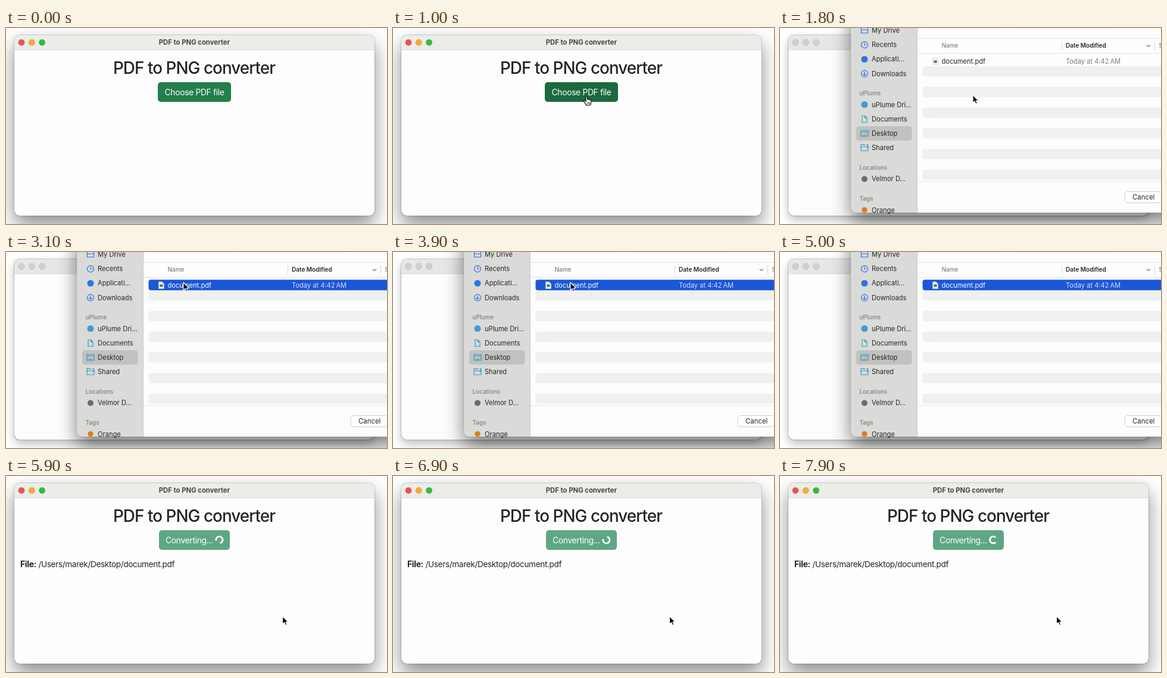
Recreate the animation shown at these times as an HTML page. Size 640 by 329 pixels, loop 8000 ms.

```html
<!DOCTYPE html>
<html lang="en">
<head>
<meta charset="utf-8">
<title>PDF to PNG converter</title>
<style>
  html, body { margin: 0; width: 100%; height: 100%; overflow: hidden; background: #fff; }
  #stage { position: relative; width: 640px; height: 329px; overflow: hidden; background: #fff; }
  svg { position: absolute; left: 0; top: 0; }
  .win { position: absolute; box-sizing: border-box; overflow: hidden; background: #fdfdfd; }
  #app { left: 14px; top: 12px; width: 605px; height: 303px; border-radius: 9px;
    box-shadow: 0 0 0 1px rgba(0,0,0,.1), 0 0 1px rgba(0,0,0,.5), 0 15px 32px rgba(0,0,0,.46); }
  #app.idle { box-shadow: 0 0 0 1px rgba(0,0,0,.13), 0 0 1px rgba(0,0,0,.5), 0 7px 16px rgba(0,0,0,.26); }
  #bar { height: 25px; background: #ecece8; border-bottom: 1px solid #d8d8d5; box-sizing: border-box; }
  .idle #bar { background: #e7e7e5; }
  #panel { left: 119px; top: -120px; width: 700px; height: 430px; border-radius: 9px;
    box-shadow: 0 0 1px rgba(0,0,0,.7), 0 15px 32px rgba(0,0,0,.5); }
  #side { width: 111px; height: 100%; background: #dadad8; border-right: 1px solid #c9c9c7; }
  text { font-family: Inter, Roboto, sans-serif; font-size: 11.1px; fill: #262626; white-space: pre; }
  .h1 { font-size: 27.8px; font-weight: 500; letter-spacing: -.033em; fill: #212529; text-anchor: middle; }
  .body { font-size: 13.9px; letter-spacing: -.025em; fill: #212529; }
  .path { font-size: 13.6px; }
  .btn { fill: #fff; }
  .bold { font-weight: 700; }
  .title { font-weight: 700; font-size: 11.3px; fill: #454545; text-anchor: middle; }
  .head { font-size: 9.9px; font-weight: 600; fill: #8a8a89; }
  .col { font-size: 10px; font-weight: 500; }
  .dim { fill: #7f7f7f; }
  .icon { fill: none; stroke: #2c75e0; stroke-width: 1.2; stroke-linejoin: round; stroke-linecap: round; }
  .teal { stroke: #329cc0; }
</style>
</head>
<body>
<div id="stage">
  <div id="app" class="win"><div id="bar"></div></div>
  <svg width="640" height="329">
    <g id="lights" stroke-width=".6"></g>
    <text id="caption" class="title" x="316.5" y="28">PDF to PNG converter</text>
    <text class="h1" x="316" y="77">PDF to PNG converter</text>
    <g id="choose">
      <rect id="chooseBox" x="255" y="91" width="123" height="33" rx="5"/>
      <text class="body btn" x="266.5" y="112.5">Choose PDF file</text>
    </g>
    <g id="busy">
      <rect x="257" y="91" width="119" height="33" rx="5" fill="#5fa784"/>
      <text class="body btn" x="268" y="112.5">Converting...</text>
      <path id="ring" d="M3.9 3.9A5.6 5.6 0 1 1 3.9 -3.9" fill="none" stroke="#fff" stroke-width="2.7"/>
      <text class="body" x="24" y="153"><tspan class="bold">File:</tspan> <tspan class="path">/Users/marek/Desktop/document.pdf</tspan></text>
    </g>
  </svg>
  <div id="dialog">
    <div id="panel" class="win"><div id="side"></div></div>
    <svg width="640" height="329">
      <rect x="128" y="165" width="93.5" height="24" rx="4.5" fill="#c1c1c0"/>
      <g id="places"></g>
      <g class="icon">
        <path d="M136.5 0V8.5H147.5V0M136.5 3H147.5"/>
        <circle cx="142" cy="28.3" r="5.5"/><path d="M142 25V28.5H144.5"/>
        <circle cx="142" cy="52.5" r="5.5" fill="#2c75e0" stroke="none"/>
        <circle cx="142" cy="76.7" r="5.5"/><path d="M142 73.7V79.5M139.8 77.5L142 79.7L144.2 77.5"/>
      </g>
      <g class="icon teal">
        <circle cx="142" cy="128.5" r="5.5" fill="#3d9bdc" stroke="none"/>
        <path d="M138 147.5H142.5L146 151V158.5H138ZM142.5 147.5V151H146"/>
        <path d="M136 172H148V182H136ZM136 174.5H148M138 180H146"/>
        <path d="M143 196.7H141L140 195.7H136V206H148V202M136 199.5H143"/>
        <circle cx="147" cy="196.5" r="1"/><path d="M145 200.3Q147 197.8 149 200.3Z"/>
      </g>
      <circle cx="142" cy="253.5" r="5" fill="#6c6c6c"/>
      <circle cx="142" cy="305.3" r="4.6" fill="#de7b16"/>
      <path d="M240 .5H381M393 .5H567" stroke="#ececec"/>
      <path d="M231 17.5H640M231 42.5H640M231 257.5H640" stroke="#e2e2e2"/>
      <path d="M473.5 23V37M629.5 23V37" stroke="#d2d2d2"/>
      <path d="M616 28.5L619 31.5L622 28.5" fill="none" stroke="#777" stroke-width="1.1"/>
      <text class="col dim" x="271.5" y="33.3">Name</text>
      <text class="col" x="480" y="33.3" style="font-weight:600">Date Modified</text>
      <text class="col dim" x="636.5" y="33.3">Size</text>
      <g id="stripes" fill="#eff0f0"></g>
      <rect id="pick" x="239.5" y="46.6" width="410" height="17.6" rx="4" fill="#1b57d6"/>
      <path d="M256.5 50H262L265.5 53.5V61.5H256.5Z" fill="#f4f4f4" stroke="#cfcfcf" stroke-width=".6"/>
      <rect x="258.2" y="54.2" width="5.5" height="4" fill="#5b84a8"/>
      <path d="M258.2 58.2L260.5 56L263.7 58.2Z" fill="#3d5a4c"/>
      <text id="name" x="271.5" y="59.8">document.pdf</text>
      <text id="date" x="480" y="59.8">Today at 4:42&#8201;AM</text>
      <rect x="579" y="274.5" width="62" height="19" rx="5" fill="#fff" stroke="#cdcdcd"/>
      <text x="592" y="288" style="font-size:11.4px">Cancel</text>
    </svg>
  </div>
  <svg width="640" height="329" stroke="#fff" stroke-linejoin="round">
    <path id="arrow" d="M0 0V13L3 10.3L5 15L7.3 14L5.3 9.5H9.5Z" fill="#000" stroke-width="1.1"/>
    <g id="hand">
      <path d="M-1.2 1C-1.2 -.6 1 -.6 1.2 1L1.8 5C2.5 4 4 4.3 4.2 5.3C5 4.6 6.2 5 6.4 6C7.3 5.5 8.500 6 8.5 7.2C8.7 10 7.5 11.5 7.2 14.5H0C-.5 12.5 -3 10 -4 8.2C-4.5 7 -3 6 -1.8 7L-.2 8.5Z" fill="#fff" stroke="#000" stroke-width="1.1"/>
      <path d="M2.2 9.5V12.5M4 9.5V12.5M5.8 9.5V12.5" stroke="#000" stroke-width=".8"/>
    </g>
  </svg>
</div>
<script>
const $ = id => document.getElementById(id);
const LOOP = 8000, STEP = 100, SPIN = 750;
const OPEN = 1400, PICK = 2900, CLOSE = 5200;

// cursor legs: start, end, from, to
const legs = [
  [100, 900, [451, 244], [324.5, 115]],
  [1000, 1800, [324.5, 115], [324, 112.5]],
  [1900, 2700, [324, 112.5], [298, 51]],
  [3900, 4900, [298, 51], [690, 284]],
  [5100, 5400, [690, 284], [464.5, 235.5]]
];

const places = [
  ["My Drive", 8], ["Recents", 32], ["Applicati...", 56.3], ["Downloads", 80.7],
  ["uPlume", 113, 1], ["uPlume Dri...", 132.5], ["Documents", 157], ["Desktop", 181], ["Shared", 205],
  ["Locations", 238, 1], ["Velmor D...", 257.3], ["Tags", 289.5, 1], ["Orange", 309.5]
];
$("places").innerHTML = places.map(([label, y, head]) =>
  `<text x="${head ? 133.5 : 154}" y="${y}" class="${head ? "head" : ""}">${label}</text>`).join("");

$("stripes").innerHTML = Array.from({ length: 6 }, (_, i) =>
  `<rect x="239.5" y="${64.2 + i * 34.67}" width="410" height="17.3" rx="4"/>`).join("");

const lights = ["#f2504a", "#f5ae2d", "#32bd3d"].map((color, i) => {
  const dot = document.createElementNS("http://www.w3.org/2000/svg", "circle");
  dot.setAttribute("cx", 26 + i * 17.3);
  dot.setAttribute("cy", 24.3);
  dot.setAttribute("r", 5.2);
  $("lights").append(dot);
  return { dot, color };
});

const show = (id, on) => $(id).style.display = on ? "" : "none";
const ease = p => p * p * (3 - 2 * p);

function cursorAt(t) {
  let pos = legs[0][2];
  for (const [start, end, a, b] of legs) {
    if (t < start) break;
    const p = ease(Math.min(1, (t - start) / (end - start)));
    pos = a.map((v, i) => v + (b[i] - v) * p);
  }
  return pos;
}

function draw(t) {
  const [x, y] = cursorAt(t);
  const modal = t >= OPEN && t < CLOSE;
  const busy = t >= CLOSE;
  const hover = !modal && !busy && x > 255 && x < 378 && y > 91 && y < 124;
  const picked = t >= PICK;

  $("app").className = modal ? "win idle" : "win";
  for (const { dot, color } of lights) {
    dot.setAttribute("fill", modal ? "#d0d0ce" : color);
    dot.setAttribute("stroke", modal ? "#b4b4b2" : "rgba(0,0,0,.18)");
  }
  $("caption").style.fill = modal ? "#aaa" : "";
  show("choose", !busy);
  show("busy", busy);
  $("chooseBox").setAttribute("fill", hover ? "#1c693f" : "#237e4c");
  $("ring").setAttribute("transform", `translate(358.3 107.3) rotate(${(t - 7900) / SPIN * 360})`);

  show("dialog", modal);
  $("dialog").style.opacity = Math.min(1, (t - OPEN + STEP) / 200);
  show("pick", picked);
  $("name").style.fill = picked ? "#fff" : "";
  $("date").style.fill = picked ? "#d3dff8" : "#7f7f7f";

  show("arrow", t >= 100 && !hover);
  show("hand", hover);
  for (const id of ["arrow", "hand"]) $(id).setAttribute("transform", `translate(${x} ${y})`);
}

function tick(now) {
  draw(Math.floor(now % LOOP / STEP) * STEP);
  requestAnimationFrame(tick);
}
draw(0);
requestAnimationFrame(tick);
</script>
</body>
</html>
```
